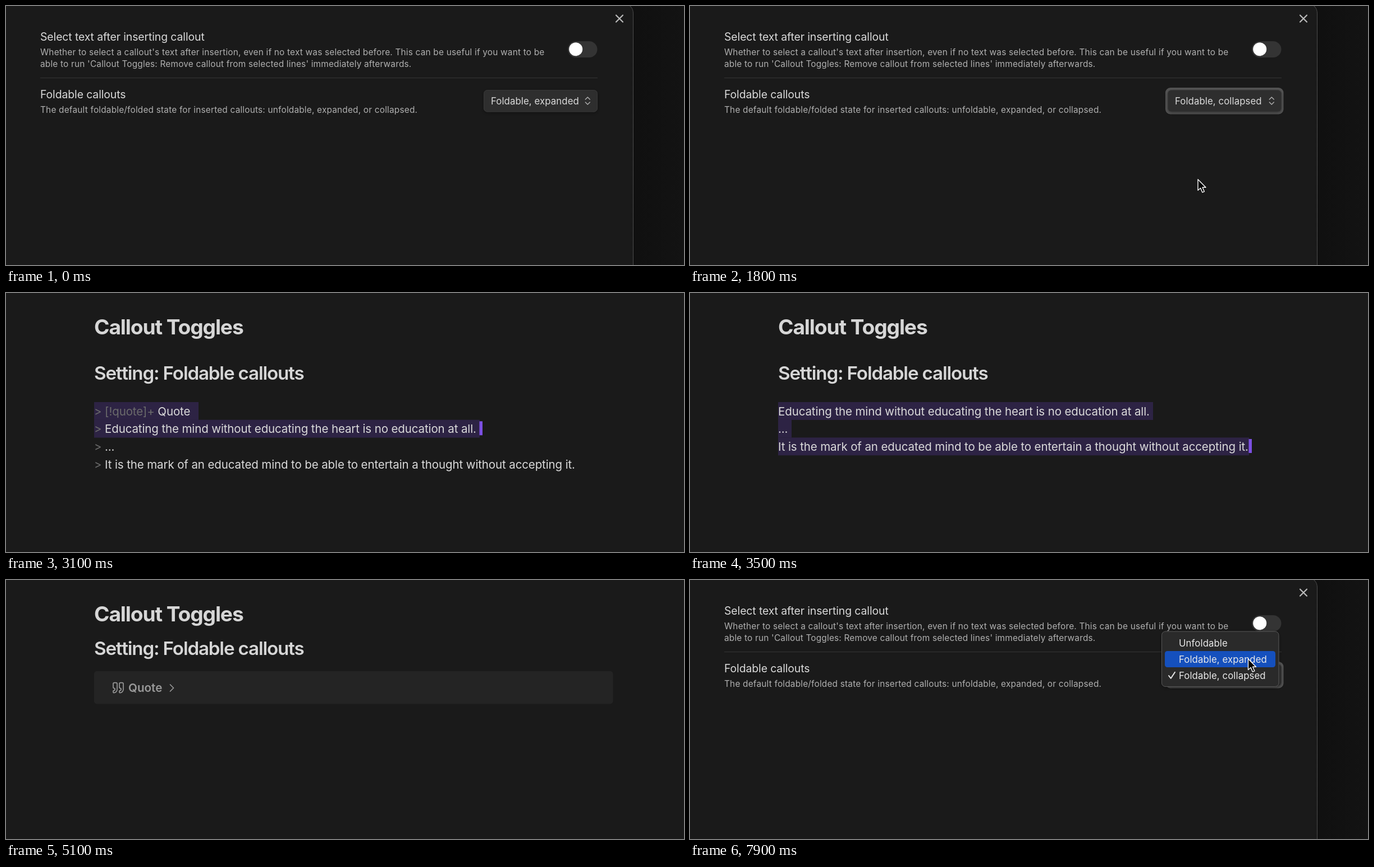
An HTML page that plays this animation: 1208x463 px, repeating every 8000 ms.

```html
<!DOCTYPE html>
<html lang="en">
<head>
<meta charset="utf-8">
<title>Foldable callouts</title>
<style>
html, body { margin: 0; width: 100%; height: 100%; overflow: hidden; background: #1a1a1a; }
svg { display: block; width: 1208px; height: 463px; }
text { font-family: Inter, "Open Sans", sans-serif; font-optical-sizing: none; fill: #dadada; white-space: pre; }
.name { font-size: 19.4px; letter-spacing: -.1px; }
.desc { font-size: 15.4px; letter-spacing: .186px; fill: #b0b0b0; }
.ui { font-size: 16.8px; letter-spacing: .08px; }
.item { fill: #e9e9e9; }
.h1 { font-size: 37.2px; font-weight: 700; letter-spacing: -1.12px; fill: #d6d6d6; }
.h2 { font-size: 33.2px; font-weight: 600; letter-spacing: -1.17px; fill: #d6d6d6; }
.body { font-size: 20.5px; letter-spacing: -.115px; }
.quote { font-size: 20.6px; font-weight: 600; fill: #999; }
.mark { fill: #6b6b6b; }
.line { fill: none; stroke-linecap: round; stroke-linejoin: round; }
</style>
</head>
<body>
<svg viewBox="0 0 1208 463">
  <defs>
    <filter id="soft" x="-20%" y="-30%" width="140%" height="170%">
      <feDropShadow dx="0" dy="2" stdDeviation="3" flood-color="#000" flood-opacity=".35"/>
    </filter>
    <linearGradient id="side">
      <stop offset="0" stop-color="#0f0f0f"/>
      <stop offset="1" stop-color="#131313"/>
    </linearGradient>
  </defs>

  <g id="settings">
    <rect x="1100" width="108" height="463" fill="url(#side)"/>
    <path d="M-2-4H1102A15.5 17 0 0 1 1117.5 13V470H-2Z" fill="#1a1a1a" stroke="#4c4c4c"/>
    <path class="line" d="M1087 16.5l12 12m0-12l-12 12" stroke="#bababa" stroke-width="2.2"/>
    <text class="name" x="61" y="61.5">Select text after inserting callout</text>
    <text class="desc" x="61" y="88">Whether to select a callout's text after insertion, even if no text was selected before. This can be useful if you want to be</text>
    <text class="desc" x="61" y="108.5">able to run 'Callout Toggles: Remove callout from selected lines' immediately afterwards.</text>
    <rect x="1001" y="63" width="52.5" height="29" rx="14.5" fill="#343434"/>
    <circle cx="1015.2" cy="77.3" r="12" fill="#fff"/>
    <path d="M61 128.5H1054" stroke="#343434"/>
    <text class="name" x="61" y="164.5">Foldable callouts</text>
    <text class="desc" x="61" y="190.5">The default foldable/folded state for inserted callouts: unfoldable, expanded, or collapsed.</text>
    <rect id="ring" x="847" y="146" width="210.5" height="47.5" rx="9" fill="#555"/>
    <rect x="851.5" y="150.5" width="202" height="38.5" rx="6" fill="#2d2d2d" stroke="#393939" filter="url(#soft)"/>
    <text class="ui" id="choice" x="864" y="175.5"></text>
    <path class="line" d="M1032.3 167l4-4 4 4m-8 5l4 4 4-4" stroke="#b0b0b0" stroke-width="1.4"/>
    <g id="menu">
      <rect x="840.5" y="0" width="208.5" height="98.5" rx="6.5" fill="#2b2b2b" stroke="#565656" filter="url(#soft)"/>
      <rect id="hover" x="846" width="197" height="29" rx="4.5" fill="#1550bd"/>
      <path id="check" class="line" d="M853 15l3.8 4.8L864 8.8" stroke="#e9e9e9" stroke-width="2"/>
      <text class="ui item" x="871" y="27">Unfoldable</text>
      <text class="ui item" x="871" y="56">Foldable, expanded</text>
      <text class="ui item" x="871" y="85">Foldable, collapsed</text>
    </g>
    <path id="pointer" d="M0 0V19.5L4.6 15.4 8 23.2 11.4 21.7 8.1 14.2H14Z" fill="#000" stroke="#fff" stroke-width="1.4" stroke-linejoin="round"/>
  </g>

  <g id="note">
    <rect width="1208" height="463" fill="#1a1a1a"/>
    <text class="h1" x="157" y="73.5">Callout Toggles</text>
    <text class="h2" id="heading" x="157" y="134">Setting: Foldable callouts</text>
    <g id="callout">
      <rect id="box" x="157" y="163" width="924.5" rx="5" fill="#242424"/>
      <g class="line" stroke="#999" stroke-width="1.7">
        <path id="mark" d="M204 183.6a2 2 0 0 0-2 2v6a2 2 0 0 0 2 2 1 1 0 0 1 1 1v1a2 2 0 0 1-2 2 1 1 0 0 0-1 1v2a1 1 0 0 0 1 1 6 6 0 0 0 6-6v-10a2 2 0 0 0-2-2z"/>
        <use href="#mark" x="-11"/>
        <path id="fold"/>
      </g>
      <text class="quote" x="218" y="200">Quote</text>
    </g>
    <g id="selection" fill="#2d2344"></g>
    <text class="body" id="tag" x="157" y="218.5"><tspan class="mark">&gt; [!quote]</tspan><tspan class="mark" id="sign"></tspan> Quote</text>
    <g id="lines"></g>
    <g id="prefix"></g>
    <rect id="caret" width="5.5" height="25" fill="#7c50e2"/>
  </g>
</svg>
<script>
const LOOP = 8000, STEP = 100, ROW = 31.7;
const EXPANDED = 1, COLLAPSED = 2;
const OPTIONS = ["Unfoldable", "Foldable, expanded", "Foldable, collapsed"];
const LINES = [
  "Educating the mind without educating the heart is no education at all.",
  "...",
  "It is the mark of an educated mind to be able to entertain a thought without accepting it."
];
const LINE_ENDS = [668, 24, 839];

// time, x, y of the pointer tip
const FIRST_VISIT = [[400, 946, 361], [600, 940, 262], [800, 934, 174], [1000, 931, 172],
  [1200, 918.5, 185], [1400, 914, 197], [1500, 914, 199], [1900, 902, 347]];
const SECOND_VISIT = [[7100, 1010, 284], [7300, 1008, 220], [7500, 1004, 172],
  [7700, 1001, 168], [7900, 994.5, 141]];

const $ = id => document.getElementById(id);
const show = (id, on) => $(id).setAttribute("display", on ? "inline" : "none");
const move = (id, x, y) => $(id).setAttribute("transform", `translate(${x} ${y})`);

function add(parent, name, attrs, text = "") {
  const el = document.createElementNS("http://www.w3.org/2000/svg", name);
  for (const key in attrs) el.setAttribute(key, attrs[key]);
  el.textContent = text;
  return $(parent).appendChild(el);
}

LINES.forEach((text, i) => {
  add("lines", "text", { class: "body", y: i * ROW }, text);
  add("prefix", "text", { class: "body mark", x: 157, y: 218.5 + (i + 1) * ROW }, ">");
});
const bars = Array.from({ length: 4 }, (_, i) =>
  add("selection", "rect", { x: 157, y: 195 + i * ROW, height: ROW + .2 }));

function along(path, t) {
  const end = path.findIndex(p => p[0] >= t);
  if (end < 0) return null;
  const b = path[end];
  if (end === 0) return b[0] === t ? b.slice(1) : null;
  const a = path[end - 1], k = (t - a[0]) / (b[0] - a[0]);
  return [a[1] + (b[1] - a[1]) * k, a[2] + (b[2] - a[2]) * k];
}

function drawSettings(t) {
  const second = t >= 6800;
  const open = (t >= 900 && t < 1500) || t >= 7600;
  const picked = second ? COLLAPSED : EXPANDED;
  $("choice").textContent = OPTIONS[t < 1500 ? EXPANDED : COLLAPSED];
  show("ring", (t >= 900 && t < 2600) || t >= 7600);
  show("menu", open);
  if (open) {
    const hover = second ? (t < 7800 ? COLLAPSED : EXPANDED) : (t < 1200 ? EXPANDED : COLLAPSED);
    move("menu", 0, second ? 92 : 121);
    $("hover").setAttribute("y", 6 + 29 * hover);
    move("check", 0, 6 + 29 * picked);
  }
  const tip = along(second ? SECOND_VISIT : FIRST_VISIT, t);
  show("pointer", tip);
  if (tip) move("pointer", ...tip);
}

function drawNote(t) {
  const before = t < 3000, after = t >= 4700;
  const editing = !before && !after;
  const raw = editing && (t < 3400 || t >= 4000);
  $("heading").setAttribute("y", editing ? 155 : 134);
  show("callout", !editing);
  $("box").setAttribute("height", before ? 195.5 : 58.5);
  $("fold").setAttribute("d", before ? "M289.5 190l6 6 6-6" : "M292.5 187l6 6-6 6");

  show("lines", !after);
  if (before) move("lines", 189, 250.5);
  else move("lines", raw ? 176 : 157, 218.5 + (raw ? ROW : 0));
  show("tag", raw);
  show("prefix", raw);
  $("sign").textContent = t < 4000 ? "+" : "-";

  show("selection", editing);
  show("caret", editing);
  if (!editing) return;
  const ends = raw ? [186, ...LINE_ENDS.map(w => w + 19)] : LINE_ENDS;
  const last = Math.min(ends.length - 1, (t - 3000) / STEP);
  bars.forEach((bar, i) => bar.setAttribute("width", i <= last ? ends[i] : 0));
  move("caret", 156.5 + ends[last], 197.6 + last * ROW);
}

function draw(now) {
  const t = Math.floor((now % LOOP) / STEP) * STEP;
  const inNote = t >= 2600 && t < 6800;
  show("settings", !inNote);
  show("note", inNote);
  if (inNote) drawNote(t);
  else drawSettings(t);
}

const start = performance.now();
function tick() {
  draw(performance.now() - start);
  requestAnimationFrame(tick);
}
tick();
</script>
</body>
</html>
```
